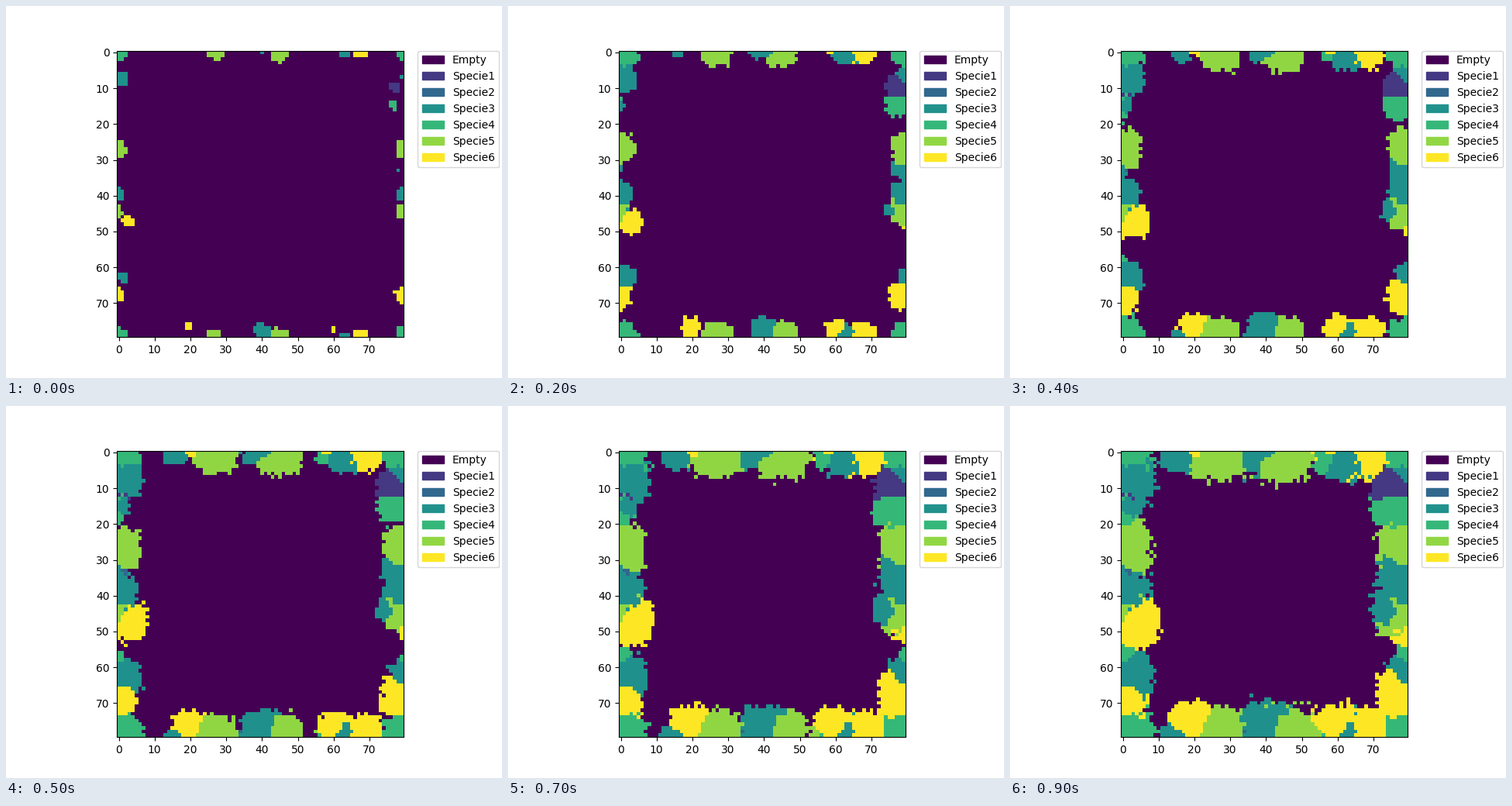
Recreate the animation shown at these times as a matplotlib script. Size 640 by 480 pixels, loop 1000 ms.

```python
import numpy as np
import matplotlib.pyplot as plt
from matplotlib.animation import FuncAnimation
from matplotlib.patches import Patch

SIZE = 80
STEPS = 10
FINAL_GROWTH = 6.2
NAMES = ["Empty"] + [f"Specie{i}" for i in range(1, 7)]

# Seeds by species: x, y and starting radius; a negative radius is born later.
SEEDS = {
    1: [(77, 10, 1.4)],
    2: [(1, 33.5, -2.5), (34, 78, -3.5)],
    3: [(1, 7.5, 1.8), (0, 15, -0.8), (77.7, 33, 0.4), (79.5, 40, 2),
        (75.5, 44, 0), (1, 63, 1.4), (16, 0.5, -0.6), (40, 78, 2.1),
        (62.8, 0, 1.8)],
    4: [(0, -0.5, 2.6), (76.8, 15, 1.1), (0, 57.5, -2.2), (57.5, 1, -1.4)],
    5: [(-0.3, 27, 2.3), (79, 44.5, 1.9), (26.8, -0.3, 2.4),
        (44.7, -0.2, 2.7), (55, 78.5, -3.3)],
    6: [(2.5, 47.3, 1.5), (79, 68, 2.1), (19.5, 76.5, 0.7),
        (67.7, -0.7, 2.1), (60, 77.5, 0.9)],
}

rng = np.random.default_rng(7)
rows, cols = np.mgrid[:SIZE, :SIZE]


def gap(cells, center):
    """Distance along one axis of the torus."""
    return np.abs((cells - center + SIZE / 2) % SIZE - SIZE / 2)


def settle():
    """Give every cell to the colony that reaches it first."""
    owner = np.zeros((SIZE, SIZE), int)
    arrival = np.full((SIZE, SIZE), np.inf)
    for species, seeds in SEEDS.items():
        for x, y, radius in seeds:
            distance = np.cbrt(gap(cols, x) ** 3 + gap(rows, y) ** 3)
            reached = distance * rng.normal(1, 0.08, distance.shape) - radius
            first = reached < arrival
            owner[first] = species
            arrival[first] = reached[first]
    return owner, arrival


owner, arrival = settle()


def world(step):
    growth = FINAL_GROWTH * (step / (STEPS - 1)) ** 0.8
    return np.where(arrival < growth, owner, 0)


fig, ax = plt.subplots(figsize=(6.4, 4.8), dpi=100)
image = ax.imshow(world(0), cmap="viridis", vmin=0, vmax=6, interpolation="nearest")
handles = [Patch(color=image.cmap(image.norm(i)), label=name)
           for i, name in enumerate(NAMES)]
ax.legend(handles=handles, bbox_to_anchor=(1.05, 1), loc="upper left", borderaxespad=0)


def update(step):
    image.set_data(world(step))
    return [image]


anim = FuncAnimation(fig, update, frames=STEPS, interval=100, repeat=True, repeat_delay=0)
plt.show()
```
